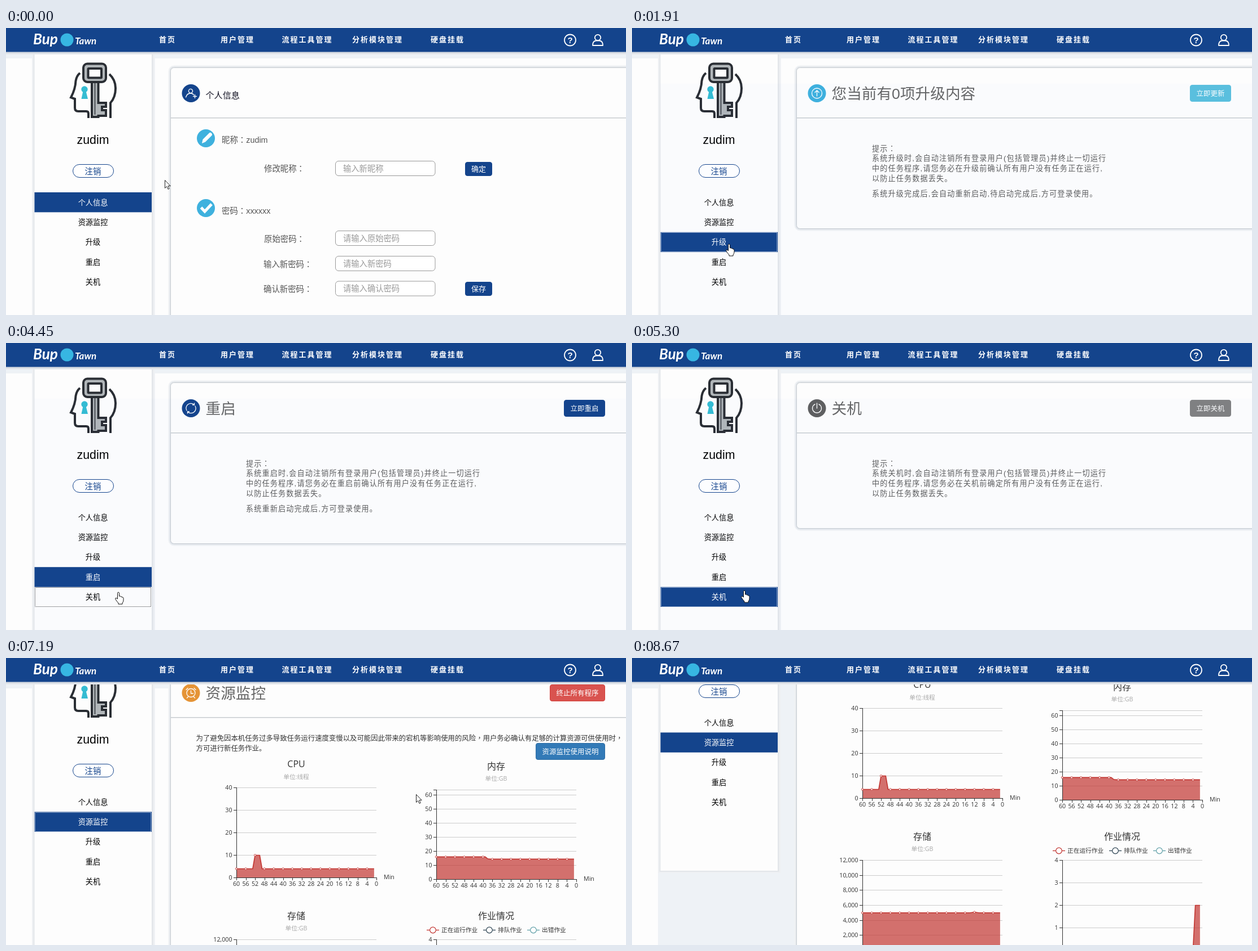
An HTML page for the animation above (8770 ms loop, 1098 by 510 pixels).

```html
<!DOCTYPE html>
<html lang="zh-CN">
<head>
<meta charset="utf-8">
<title>控制台</title>
<style>
html, body { margin: 0; width: 100%; height: 100%; overflow: hidden; background: #eef2f6; }
svg { display: block; width: 1098px; height: 510px; }
text { font-family: "Liberation Sans", "Noto Sans CJK SC", "Noto Sans CJK", sans-serif; white-space: pre; }
.chart text { font-family: "Open Sans", "Noto Sans CJK SC", "Noto Sans CJK", sans-serif; }
.centred { font-family: "Noto Sans CJK TC", "Noto Sans CJK", sans-serif; }
</style>
</head>
<body>
<svg id="stage" viewBox="0 0 1098 510" xmlns="http://www.w3.org/2000/svg"></svg>
<script>
const LOOP = 8770;
const BLUE = '#14448c', CYAN = '#3fb1de', RED = '#c23531', PAPER = '#fdfdfd';
const USER = 'zudim';

// wide colons and commas sit in the middle of their cell
const punctuate = s => String(s).replace(/[：，]/g, '<tspan class="centred" lang="zh-TW">$&</tspan>');
// cy is the optical middle of the glyphs
const text = (s, x, cy, size, fill, extra = '') =>
  `<text x="${x}" y="${(cy + size * 0.37).toFixed(2)}" font-size="${size}" fill="${fill}" ${extra}>${punctuate(s)}</text>`;
const MID = 'text-anchor="middle"', END = 'text-anchor="end"';
const rect = (x, y, w, h, fill, extra = '') =>
  `<rect x="${x}" y="${y}" width="${w}" height="${h}" fill="${fill}" ${extra}/>`;
const disc = (x, y, r, fill, extra = '') => `<circle cx="${x}" cy="${y}" r="${r}" fill="${fill}" ${extra}/>`;
const line = (d, color, width = 1, extra = '') =>
  `<path d="${d}" fill="none" stroke="${color}" stroke-width="${width}" ${extra}/>`;
const button = (x, y, w, h, label, fill, size = 12.5, edge = fill) =>
  rect(x + .5, y + .5, w - 1, h - 1, fill, `rx="3.5" stroke="${edge}"`) +
  text(label, x + w / 2, y + h / 2, size, '#fff', MID);

function panel(bottom) {
  const box = (fill, extra) => rect(291.5, 70.5, 900, bottom - 70.5, fill, 'rx="6" ' + extra);
  return box('none', 'stroke="#f0f2f4" stroke-width="8"') + box('none', 'stroke="#e2e6ea" stroke-width="4"') +
    box(PAPER, 'stroke="#c8cdd2"') + rect(292, 159, 806, 1.5, '#c8cccf');
}

const badge = (fill, glyph) => disc(327.5, 116, 16, fill) +
  `<g transform="translate(327.5 116)" fill="none" stroke="#fff" stroke-width="1.3" stroke-linecap="round">${glyph}</g>`;
const heading = s => text(s, 353.5, 116.5, 26.67, '#666');

const glyphs = {
  person: '<circle cy="-4" r="3.6" cx="-.5"/><path d="M-9 7Q-7 0-.5 0Q3 0 5 3M4 5.500h6M7 2.500v6"/>',
  up: '<circle r="9"/><path d="M0 5V-5M-3.500-1.500L0-5L3.500-1.500"/>',
  cycle: '<path d="M-7.500 4A8.500 8.500 0 0 1 5-7M7.500-4A8.500 8.500 0 0 1-5 7M6-9v3h-3M-6 9v-3h3"/>',
  power: '<path d="M-3.500-7.200A8 8 0 1 0 3.500-7.200M0-9V0"/>',
  clock: '<circle r="7.500"/><path d="M0-4V1H4M-8.500-5.500L-5.500-8.500M8.500-5.500L5.500-8.500M-5 7l-2 2M5 7l2 2"/>'
};

function profilePage() {
  const label = (s, x, y) => text(s, x, y, 14.4, '#555');
  const field = (y, hint) => rect(583.5, y + .5, 176.5, 26, '#fff', 'rx="5.5" stroke="#999"') +
    text(hint, 597, y + 13.5, 14.3, '#999');
  return panel(700) + badge(BLUE, glyphs.person) + text('个人信息', 353.5, 119.5, 15.1, '#112') +
    disc(354, 196, 16, CYAN) +
    '<path d="M347 205l1.500-7L360 186.500q2-1.500 4 .5t.5 4L353 202.500z" fill="#fff"/>' +
    label('昵称：' + USER, 382, 199) + label('修改昵称：', 457, 250) + field(236, '输入新昵称') +
    button(813, 238, 48, 25, '确定', BLUE, 13) +
    disc(354, 320, 16, CYAN) + line('M345.500 319l6.500 7L364 313', '#fff', 5) +
    label('密码：xxxxxx', 382, 324.5) +
    label('原始密码：', 457, 375) + field(360, '请输入原始密码') +
    label('输入新密码：', 456, 419.5) + field(405, '请输入新密码') +
    label('确认新密码：', 456, 463.5) + field(449.5, '请输入确认密码') +
    button(813, 451, 48, 25, '保存', BLUE, 13);
}

function noticePage(action, verb, title, color, glyph, buttonColor, tail) {
  const lines = ['提示：', `系统${action}时,会自动注销所有登录用户(包括管理员)并终止一切运行`,
    `中的任务程序,请您务必在${action}前${verb}所有用户没有任务正在运行,`, '以防止任务数据丢失。'];
  const note = (s, y) => text(s, 425, y, 13.1, '#5c5c5c', 'letter-spacing="1.17"');
  return panel(tail ? 356.5 : 329.5) + badge(color, glyph) + heading(title) +
    button(988, 101, 73, 30, '立即' + (action === '升级' ? '更新' : action), buttonColor) +
    lines.map((s, i) => note(s, 213.7 + i * 17.8)).join('') + (tail ? note(tail, 293.7) : '');
}

function chart({ x, top, base, max, step, title, titleY, unit, value, comma, marks = true }) {
  const yOf = v => base - (base - top) * v / max;
  const xOf = m => x + 248 * (60 - m) / 60;
  const small = (s, px, py, extra, fill = '#333') => text(s, px, py, 10.7, fill, extra);
  let out = text(title, x + 106, titleY, 16, '#333', MID);
  if (unit) out += small('单位:' + unit, x + 106, titleY + 22.5, MID, '#aaa');
  const levels = [];
  for (let v = 0; v <= max; v += step) levels.push(v);
  if (levels[levels.length - 1] < max) levels.push(max);
  for (const v of levels) {
    const y = Math.round(yOf(v)) + .5;
    if (v) out += line(`M${x} ${y}h248`, '#ccc');
    out += line(`M${x - 5} ${y}h5`, '#333');
    if (v % step === 0) out += small(comma ? v.toLocaleString('en-US') : v, x - 7.5, y - .5, END);
  }
  const points = [];
  for (let m = 60; m >= 1; m--) points.push(xOf(m).toFixed(1) + ' ' + (yOf(value(m)) + .5).toFixed(1));
  const curve = 'M' + points.join('L');
  out += `<path d="${curve}V${base}H${x}Z" fill="${RED}" opacity=".7"/>`;
  out += line(`M${x + .5} ${top}V${base + .5}H${x + 248}`, '#333');
  for (let m = 60; m >= 0; m -= 4) {
    out += line(`M${Math.round(xOf(m)) + .5} ${base}v5`, '#333') + small(m, xOf(m), base + 11.5, MID);
  }
  out += line(curve, RED, 1.6, 'stroke-linejoin="round"');
  if (marks) for (let m = 60; m > 0; m -= 4) {
    out += disc(xOf(m), yOf(value(m)) + .5, 1.7, '#fff', `stroke="${RED}" stroke-width=".9"`);
  }
  return out + small('Min', x + 261, base - .5, '');
}

function monitorPage() {
  const legend = [['正在运行作业', 756, RED], ['排队作业', 856, '#2f4554'], ['出错作业', 934, '#61a0a8']];
  const charts = [
    { x: 408, top: 284, base: 444, max: 40, step: 10, title: 'CPU', titleY: 242.5, unit: '线程',
      value: m => m >= 50 && m <= 52 ? 10 : 4 },
    { x: 762, top: 288, base: 447, max: 63.5, step: 10, title: '内存', titleY: 246, unit: 'GB',
      value: m => m >= 39 ? 16 : m === 38 ? 14.7 : 14.4 },
    { x: 408, top: 554, base: 714, max: 12000, step: 2000, title: '存储', titleY: 512, unit: 'GB', comma: true,
      value: m => 5000 + 90 * Math.max(0, 1 - Math.abs(m - 12) / 2) },
    { x: 762, top: 554, base: 714, max: 4, step: 1, title: '作业情况', titleY: 512, marks: false,
      value: m => m <= 3 ? 2 : 0 }
  ];
  return panel(1000) + badge('#e59437', glyphs.clock) + heading('资源监控') +
    button(963, 101, 98, 30, '终止所有程序', '#d9534f', 12.5, '#d43f3a') +
    text('为了避免因本机任务过多导致任务运行速度变慢以及可能因此带来的宕机等影响使用的风险，用户务必确认有足够的计算资源可供使用时，', 336.5, 196.5, 12.4, '#333') +
    text('方可进行新任务作业。', 336.5, 214.5, 12.4, '#333') +
    button(938, 205, 123, 30, '资源监控使用说明', '#337ab7', 12.5, '#2e6da4') +
    '<g class="chart">' + charts.map(chart).join('') +
    legend.map(([s, x, c]) => line(`M${x - 11} 537.500h22`, c, 1.3) +
      disc(x, 537.5, 5.3, '#fff', `stroke="${c}" stroke-width="1.2"`) +
      text(s, x + 15, 537, 10.7, '#333')).join('') + '</g>';
}

const ITEMS = ['个人信息', '资源监控', '升级', '重启', '关机'];
const itemTop = i => 292 + i * 35.4;

function sidebar() {
  const dark = '#2a2e34';
  return rect(46, 43, 217.5, 534, '#eef0f3') + rect(48.5, 45, 212, 530, '#e3e6ea') + rect(50.5, 47, 207.5, 526, PAPER) +
    line('M131 80Q125 85 123.500 94Q123 108 115 123.500L122 126V142Q122 148 128 148H142Q146 148 146 152V160M183 82Q194 92 194 107Q194 123 185 133V160', dark, 4) +
    `<g fill="#b1b6b9" stroke="${dark}" stroke-width="4">
      <path d="M152 94H163.500V133H177V140H170V146H177V156H163.500V158H152Z"/>
      <rect x="137" y="63.500" width="40" height="32.500" rx="7"/></g>` +
    rect(145.5, 72, 23.5, 16.5, PAPER, `rx="1" stroke="${dark}" stroke-width="4"`) +
    line('M157.500 98V154', dark, 1.5) +
    disc(139, 109, 5.7, '#35bcd2') + '<path d="M136.500 112h5L145 126H133.500Z" fill="#35bcd2"/>' +
    text(USER, 154, 198.5, 21.3, '#000', MID) +
    rect(118.5, 242.5, 72, 23, '#fff', `rx="11.5" stroke="${BLUE}"`) +
    text('注销', 154, 254.5, 14.4, BLUE, MID) +
    `<rect id="active" x="50.500" width="207.500" height="35.400" fill="${BLUE}"/>` +
    ITEMS.map((s, i) => text(s, 154, 309.8 + i * 35.4, 13.2, '#000', MID + ' class="item"')).join('') +
    '<rect id="focus" x="51.500" width="205" height="34" fill="none" stroke-dasharray="1 1" stroke-dashoffset=".5"/>';
}

function navbar() {
  const nav = [['首页', 271], ['用户管理', 380], ['流程工具管理', 488.5], ['分析模块管理', 613], ['硬盘挂载', 752]];
  const word = (s, x, y, size) => `<text x="${x}" y="${y}" font-size="${size}" fill="#fff" font-weight="700" font-style="italic" style="font-family:Lato,sans-serif">${s}</text>`;
  return rect(0, 42, 1098, 3, '#d5dae1') + rect(0, 45, 1098, 2, '#e6e9ed') + rect(0, 0, 1098, 42.5, BLUE) +
    word('Bup', 48, 29, 26) + disc(108, 21, 11.5, '#37b6e2') + word('Tawn', 122, 29, 17) +
    nav.map(([s, x]) => text(s, x, 20, 13, '#fff', 'font-weight="700" letter-spacing="2"')).join('') +
    disc(999, 21.5, 10, 'none', 'stroke="#fff" stroke-width="1.8"') +
    text('?', 999, 21.5, 15, '#fff', MID + ' font-weight="700"') +
    disc(1048, 17, 5.2, 'none', 'stroke="#fff" stroke-width="1.8"') +
    line('M1039 31Q1039 23 1045 22.500H1051Q1057 23 1057 31Z', '#fff', 1.8, 'stroke-linejoin="round"');
}

const pages = [
  profilePage(),
  monitorPage(),
  noticePage('升级', '确认', '您当前有0项升级内容', CYAN, glyphs.up, '#5bc0de', '系统升级完成后,会自动重新启动,待启动完成后,方可登录使用。'),
  noticePage('重启', '确认', '重启', BLUE, glyphs.cycle, BLUE, '系统重新启动完成后,方可登录使用。'),
  noticePage('关机', '确定', '关机', '#5f5f5f', glyphs.power, '#808080', '')
];

document.getElementById('stage').innerHTML =
  rect(0, 0, 1098, 510, '#eef2f6') + rect(0, 54, 46, 456, PAPER) +
  `<g id="backdrop">${rect(263.5, 54, 834.5, 456, PAPER)}</g>
  <g id="scroller">${sidebar()}${pages.map(p => `<g class="page">${p}</g>`).join('')}</g>
  <g id="tint">${rect(50, 99, 1048, 411, '#3c6cff', 'opacity=".011"')}</g>
  ${navbar()}
  <path id="arrow" d="M.5 .5V14.500L3.700 11.500L6 16.500L8.200 15.500L6 10.700H10.200Z" fill="#fff" stroke="#222"/>
  <path id="hand" d="M4.500 12V2.500Q4.500 1 6 1T7.500 2.500V8Q10 7 10.500 9Q13 8.300 13 10Q15 9.800 15 11.500V15Q15 18 13 20V22H6V20Q3 17 1 13.500Q0 11 2 11Q3 11 4.500 13Z" fill="#fff" stroke="#111" stroke-linejoin="round"/>`;

const $ = id => document.getElementById(id);
const pageNodes = [...document.querySelectorAll('.page')];
const itemNodes = [...document.querySelectorAll('.item')];
const show = (node, on) => node.setAttribute('display', on ? 'inline' : 'none');

const cursorTrack = [
  [0, 'arrow', 281, 270], [650, 'arrow', 400, 256], [860, 'arrow', 578, 246], [1070, 'arrow', 460, 340],
  [1280, 'arrow', 290, 438], [1490, 'hand', 178, 398], [1700, 'hand', 166, 383], [2330, 'hand', 167, 394],
  [2540, 'hand', 169, 410], [2970, 'hand', 169, 413], [3610, 'hand', 173, 421], [3820, 'hand', 180, 434],
  [4030, 'hand', 187, 444], [4240, 'hand', 191, 448], [4450, 'hand', 193, 442], [4660, 'hand', 193, 439],
  [5510, 'hand', 207, 412], [5720, 'hand', 222, 370], [5930, 'hand', 229, 343], [6350, 'arrow', 320, 325],
  [6560, 'arrow', 500, 280], [6770, 'arrow', 650, 252], [6980, 'arrow', 726, 242],
  [8040, 'arrow', 820, 320], [8250, 'arrow', 930, 410], [8460, 'arrow', 997, 485], [8670, 'none', 0, 0]
];
const pageTrack = [[0, 0], [1700, 2], [2970, 3], [4660, 4], [6140, 1]];
const focusTrack = [[0, -1], [1700, 2], [2970, 3], [4450, 4], [4660, 4], [5930, 1], [8040, -1]];
const scrollTrack = [[0, 0], [7190, 54], [7400, 141], [7610, 195]];
const at = (track, t) => track.filter(k => k[0] <= t).pop();

function render(t) {
  const page = at(pageTrack, t)[1], focus = at(focusTrack, t)[1], scroll = at(scrollTrack, t)[1];
  pageNodes.forEach((node, i) => show(node, i === page));
  itemNodes.forEach((node, i) => node.setAttribute('fill', i === page ? '#fff' : '#000'));
  $('active').setAttribute('y', itemTop(page));
  show($('focus'), focus >= 0);
  $('focus').setAttribute('y', Math.floor(itemTop(focus)) + 1.5);
  $('focus').setAttribute('stroke', focus === page ? '#e8eef8' : '#444');
  $('scroller').setAttribute('transform', `translate(0 ${-scroll})`);
  show($('backdrop'), scroll < 100);
  show($('tint'), page > 1);
  const [, kind, x, y] = at(cursorTrack, t);
  for (const id of ['arrow', 'hand']) {
    show($(id), id === kind);
    $(id).setAttribute('transform', `translate(${x} ${y})`);
  }
}

const start = performance.now();
function tick() {
  render((performance.now() - start) % LOOP);
  requestAnimationFrame(tick);
}
render(0);
requestAnimationFrame(tick);
</script>
</body>
</html>
```
